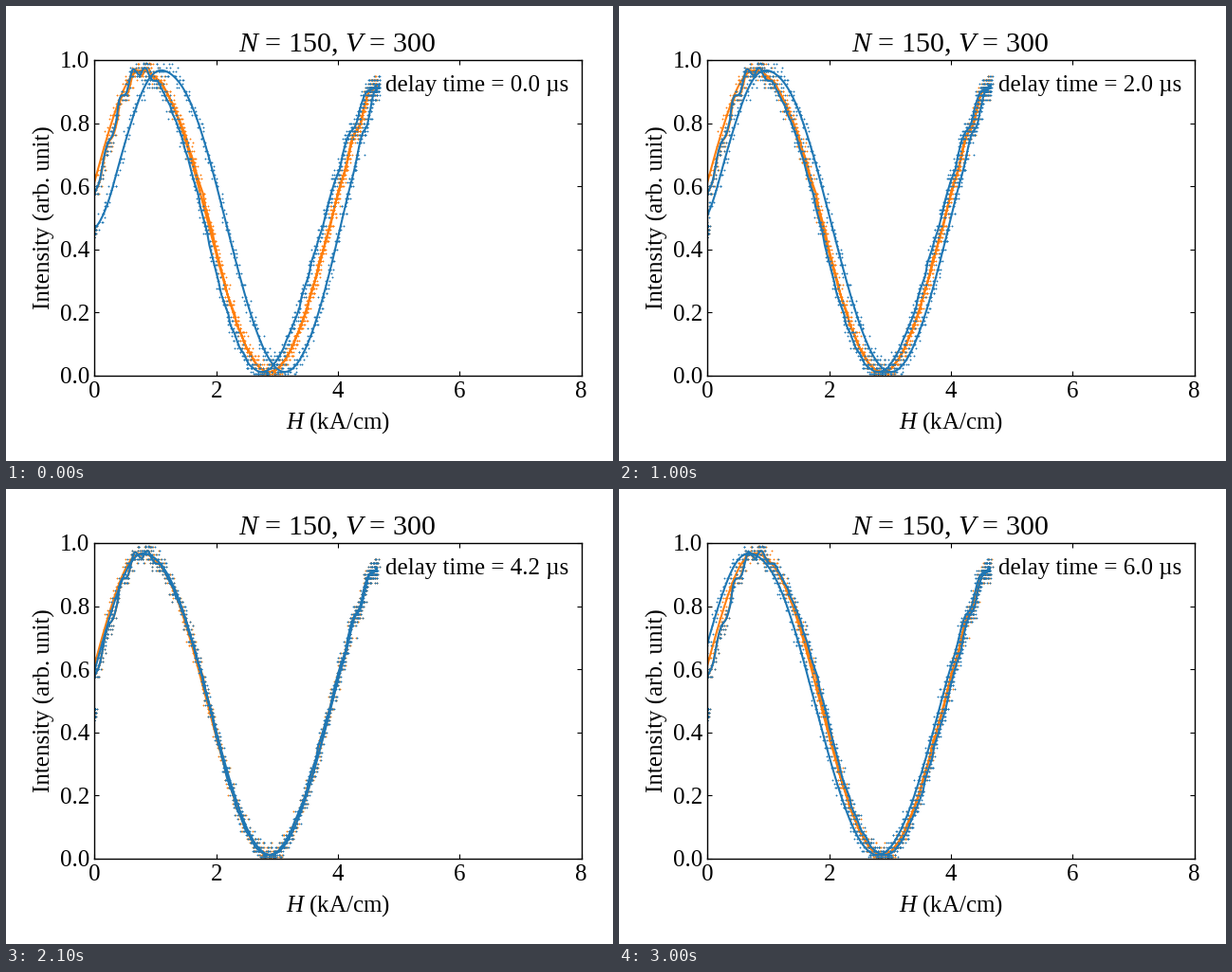
Write a matplotlib script that moves like this. It is 640 by 480 pixels and loops after 3.1 s.

```python
import numpy as np
import matplotlib.pyplot as plt
from matplotlib.animation import FuncAnimation

plt.rcParams.update({
    "font.family": "Liberation Serif",
    "font.size": 18,
    "mathtext.fontset": "custom",
    "mathtext.rm": "Liberation Serif",
    "mathtext.it": "Liberation Serif:italic",
    "axes.linewidth": 1.0,
    "xtick.direction": "in",
    "ytick.direction": "in",
    "xtick.top": True,
    "ytick.right": True,
    "xtick.major.pad": 4.5,
})

FRAMES = 31
STEP = 0.2         # delay per frame, in microseconds
REF_DELAY = 4.6    # delay at which both sweeps coincide
H_MAX = 4.68
LEVEL = 0.0125     # resolution of the measured intensity
BLUE, ORANGE = "C0", "C1"

rng = np.random.default_rng(7)


def bump(h, center, width):
    return np.exp(-((h - center) / width) ** 2)


def response(h):
    phase = (0.775 * (h - 2.87) + 0.05 * bump(h, 0.75, 0.35)
             + 0.9 * np.minimum(h, 0) ** 2)
    return 0.012 + 0.955 * np.sin(phase) ** 2


def ripple(h, crest, period, center, width):
    return np.cos(2 * np.pi * (h - crest) / period) * bump(h, center, width)


def falling(h):
    return response(h) + 0.018 * ripple(h, 4.23, 0.27, 4.4, 0.25)


def rising(h):
    lag = 0.07 * bump(h, 0.2, 0.5) + 0.035 * bump(h, 1.7, 0.4)
    return falling(h - lag) + 0.018 * ripple(h, 0.2, 0.23, 0.5, 0.6)


def shift_rising(h, delay):
    rate = 0.01 * np.clip(h, 0, None) * (1 - (h / H_MAX) ** 6)
    return h + rate * (delay - REF_DELAY)


def shift_falling(h, delay):
    rate = 0.07 * np.sqrt(np.clip(1 - (h / H_MAX) ** 2, 0, 1))
    return h - rate * (delay - REF_DELAY)


def quantize(y):
    return np.round(y / LEVEL) * LEVEL


def scatter(start, count, curve):
    """Noisy samples, dense where the field is near its peak."""
    h = 4.66 * np.sin(np.linspace(start, 1.46, count))
    y = quantize(curve(h) + rng.normal(0, 0.016, count))
    return h + rng.normal(0, 0.02, count), np.clip(y, 0.005, 0.99)


# Smooth lines
up_h = np.linspace(0, 4.64, 420)
wobble = np.interp(up_h, np.linspace(0, 4.64, 90), rng.normal(0, 0.009, 90))
down_h = np.linspace(4.64, -0.42, 420)
line_i = np.concatenate([rising(up_h), falling(down_h)])

# Measured points, with a cluster left at zero field
up_x, up_y = scatter(0, 850, rising)
down_x, down_y = scatter(-0.09, 650, falling)
rest_x = rng.normal(0, 0.015, 40)
rest_y = quantize(rng.uniform(0.44, 0.48, 40))
points_i = np.concatenate([up_y, down_y, rest_y])


def line_data(delay):
    x = np.concatenate([shift_rising(up_h, delay) + wobble,
                        shift_falling(down_h, delay)])
    return x, line_i


def point_data(delay):
    x = np.concatenate([shift_rising(up_x, delay),
                        shift_falling(down_x, delay), rest_x])
    return x, points_i


def add_series(color, delay):
    points, = ax.plot(*point_data(delay), "+", color=color, ms=2, mew=0.6)
    line, = ax.plot(*line_data(delay), color=color, lw=1.5)
    return points, line


fig = plt.figure(figsize=(6.4, 4.8), dpi=100)
fig.subplots_adjust(left=0.146, right=0.948, bottom=0.1875, top=0.8815)
ax = fig.add_subplot()
ax.set(xlim=(0, 8), ylim=(0, 1), xticks=range(0, 9, 2))
ax.set_title("$N$ = 150, $V$ = 300", x=0.499)
ax.set_xlabel("$H$ (kA/cm)", labelpad=5.8)
ax.set_ylabel("Intensity (arb. unit)")

add_series(ORANGE, REF_DELAY)
points, line = add_series(BLUE, 0)
label = ax.text(4.785, 0.902, "")


def draw(frame):
    delay = frame * STEP
    points.set_data(*point_data(delay))
    line.set_data(*line_data(delay))
    label.set_text(f"delay time = {delay:.1f} µs")
    return points, line, label


anim = FuncAnimation(fig, draw, frames=FRAMES, interval=100, repeat=True,
                     repeat_delay=0)
plt.show()
```
